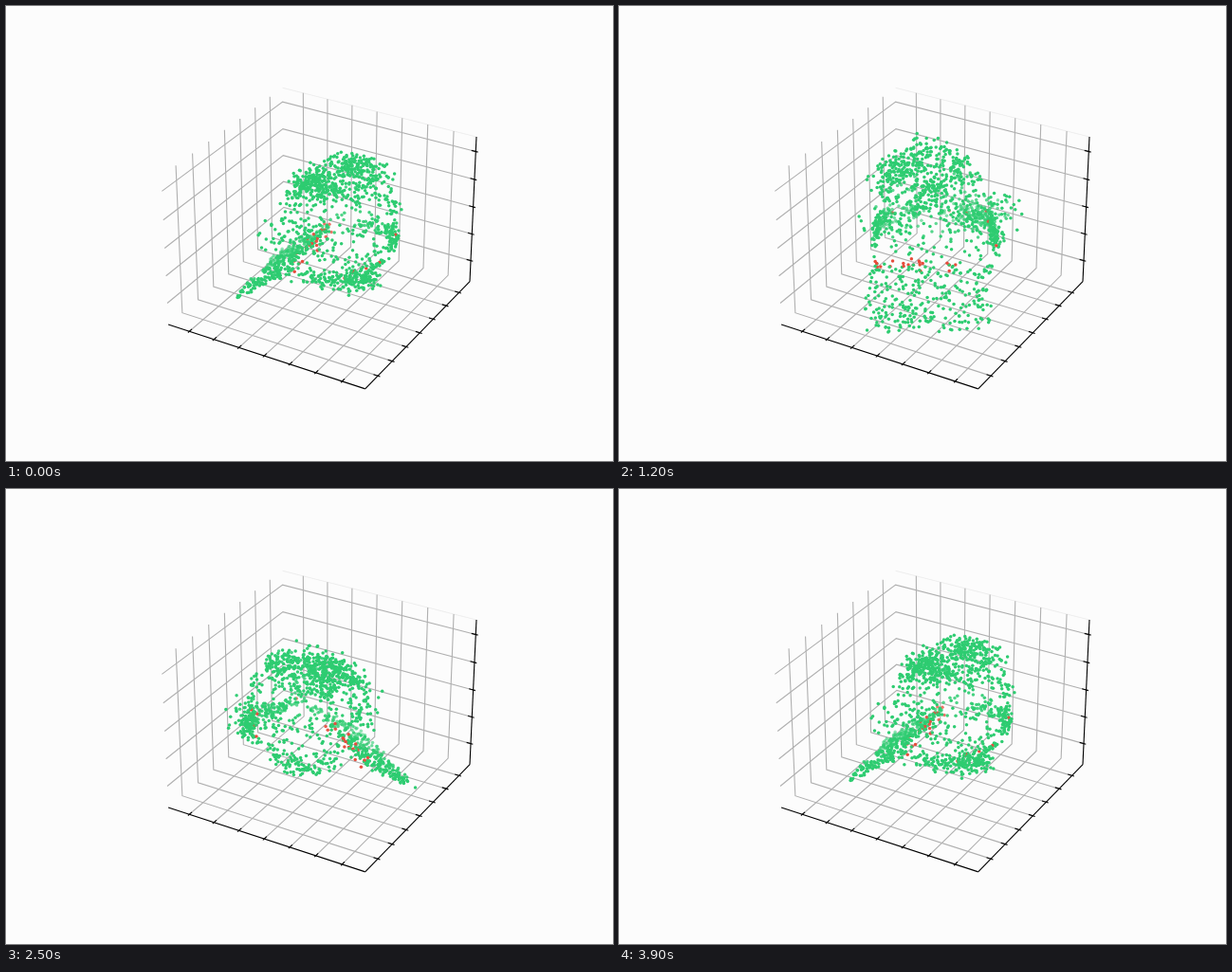
Animation, 640 px wide and 480 px high, one loop 4000 ms. Source, as an HTML page with a canvas:

```html
<!DOCTYPE html>
<html lang="en">
<head>
<meta charset="utf-8">
<title>Rotating point cloud</title>
<style>
  html, body { margin: 0; width: 100%; height: 100%; overflow: hidden; background: #fcfcfc; }
  canvas { display: block; }
</style>
</head>
<body>
<canvas id="stage" width="640" height="480"></canvas>
<script>
const ctx = document.getElementById('stage').getContext('2d');
const GREEN = '#2ecc71', RED = '#e74c3c';
const { sin, cos, sqrt, abs, sign, min, PI } = Math;
const SIN = 0.5, COS = sqrt(3) / 2;
const STEP = 100, STEPS = 40;
const BASE = -110.77 * PI / 180;

let seed = 20;
function rand() {
  seed = (seed + 0x6D2B79F5) | 0;
  let t = Math.imul(seed ^ (seed >>> 15), 1 | seed);
  t = (t + Math.imul(t ^ (t >>> 7), 61 | t)) ^ t;
  return ((t ^ (t >>> 14)) >>> 0) / 4294967296;
}
const spread = size => (rand() + rand() + rand() - 1.5) * size;

// Camera space: right, towards the viewer, height -> pixels
function project(right, near, z) {
  const scale = 1997.84 / (10 - COS * near - SIN * z);
  return [333 + right * scale, 237.4 - (COS * z - SIN * near) * scale];
}
const boxPoint = ([x, y, z]) => project(COS * x + SIN * y, SIN * x - COS * y, z);

// Point cloud, sampled from a few surfaces
const cloud = [];

function sample(n, surface, jitter, color = GREEN) {
  for (let i = 0; i < n; i++) {
    const [x, y, z] = surface(rand(), rand()).map(p => p + spread(jitter));
    cloud.push({ x, y, z, color });
  }
}

const disc = (u, v, r) => [r * sqrt(u) * cos(2 * PI * v), r * sqrt(u) * sin(2 * PI * v)];
const blob = (x, y, z, size) => () => [x + spread(size), y + spread(size), z + spread(size / 2)];
const soft = a => sign(a) * abs(a) ** 0.4;

// Rounded outline from the right front over the back to the left front
const ring = (u, z, width = 0.32) => [width * soft(cos(PI * u)), 0.12 - 0.47 * soft(sin(PI * u)), z];
const sheet = (u, v) => [-0.39 + 0.67 * u + 0.04 * v, 0.37 + 0.05 * u - 0.3 * v, -0.39 + 0.025 * u + 0.23 * v];
const rim = (u, v) => ring(u ** 1.3, -0.13 + 0.08 * v);
const wall = (u, v) => ring(u, -0.04 + 0.26 * v, 0.32 - 0.1 * v);
const seat = (u, v) => [0.5 * u - 0.26, 0.36 * v - 0.27, -0.12];

const clumps = Array.from({ length: 40 }, () => disc(rand(), rand(), 0.26));
function roof(u, v) {
  let [x, y] = disc(u, v, 0.27);
  if (rand() < 0.65) {
    const clump = clumps[Math.floor(u * clumps.length)];
    x = clump[0] + spread(0.06);
    y = clump[1] + spread(0.06);
  }
  return [x - 0.05, y - 0.06, 0.325 - 0.3 * y - 0.9 * (x * x + y * y) + spread(0.07)];
}

sample(470, roof, 0.01);
sample(280, sheet, 0.015);
sample(270, rim, 0.025);
sample(95, wall, 0.04);
sample(45, seat, 0.02);
sample(110, blob(0.22, 0.02, 0.1, 0.2), 0.01);
sample(50, blob(-0.25, 0.09, 0.1, 0.12), 0.03);
sample(45, blob(0.27, -0.28, -0.07, 0.13), 0.01);
sample(20, u => [0.46 * u - 0.32, 0.09, -0.15], 0.035, RED);
sample(6, u => ring(u * 0.7, -0.07), 0.03, RED);

// Axes box
const W = 0.5952, H = 0.4464;
const ticks = (count, gap, middle) =>
  Array.from({ length: count }, (_, i) => middle + (i - (count - 1) / 2) * gap);
const planTicks = ticks(7, 0.154, 0);
const zTicks = ticks(5, 0.168, 0.0235);

function lines(color, paths) {
  ctx.strokeStyle = color;
  ctx.lineWidth = 1.11;
  for (const path of paths) {
    ctx.beginPath();
    for (const p of path) ctx.lineTo(...boxPoint(p));
    ctx.stroke();
  }
}

function drawBox() {
  lines('#eee', [[[-W, W, H], [W, W, H]]]);
  lines('#b0b0b0', [
    ...planTicks.map(x => [[x, -W, -H], [x, W, -H], [x, W, H]]),
    ...planTicks.map(y => [[W, y, -H], [-W, y, -H], [-W, y, H]]),
    ...zTicks.map(z => [[-W, -W, z], [-W, W, z], [W, W, z]])
  ]);
  const out = W + 0.013, inn = W - 0.025;
  lines('#000', [
    [[-W, -W, -H], [W, -W, -H]],
    [[W, -W, -H], [W, W, -H]],
    [[W, W, -H], [W, W, H]],
    ...planTicks.map(x => [[x, -out, -H], [x, -inn, -H]]),
    ...planTicks.map(y => [[out, y, -H], [inn, y, -H]]),
    ...zTicks.map(z => [[out, W, z], [inn, W, z]])
  ]);
}

function drawCloud(angle) {
  const c = cos(angle), s = sin(angle);
  const dots = cloud.map(({ x, y, z, color }) => {
    const near = y * c - x * s;
    return { at: project(x * c + y * s, near, z), depth: COS * near + SIN * z, color };
  }).sort((a, b) => a.depth - b.depth);
  const far = dots[0].depth, range = dots[dots.length - 1].depth - far;
  for (const { at, depth, color } of dots) {
    ctx.globalAlpha = min(1, 0.5 + 1.2 * (depth - far) / range);
    ctx.fillStyle = color;
    ctx.beginPath();
    ctx.arc(...at, 1.75, 0, 2 * PI);
    ctx.fill();
  }
  ctx.globalAlpha = 1;
}

function draw(step) {
  ctx.fillStyle = '#fcfcfc';
  ctx.fillRect(0, 0, 640, 480);
  drawBox();
  drawCloud(BASE + 2 * PI * step / (STEPS - 1));
}

let shown = -1;
const start = performance.now();
function tick() {
  const step = Math.floor((performance.now() - start) / STEP) % STEPS;
  if (step !== shown) draw(shown = step);
  requestAnimationFrame(tick);
}
tick();
</script>
</body>
</html>
```
